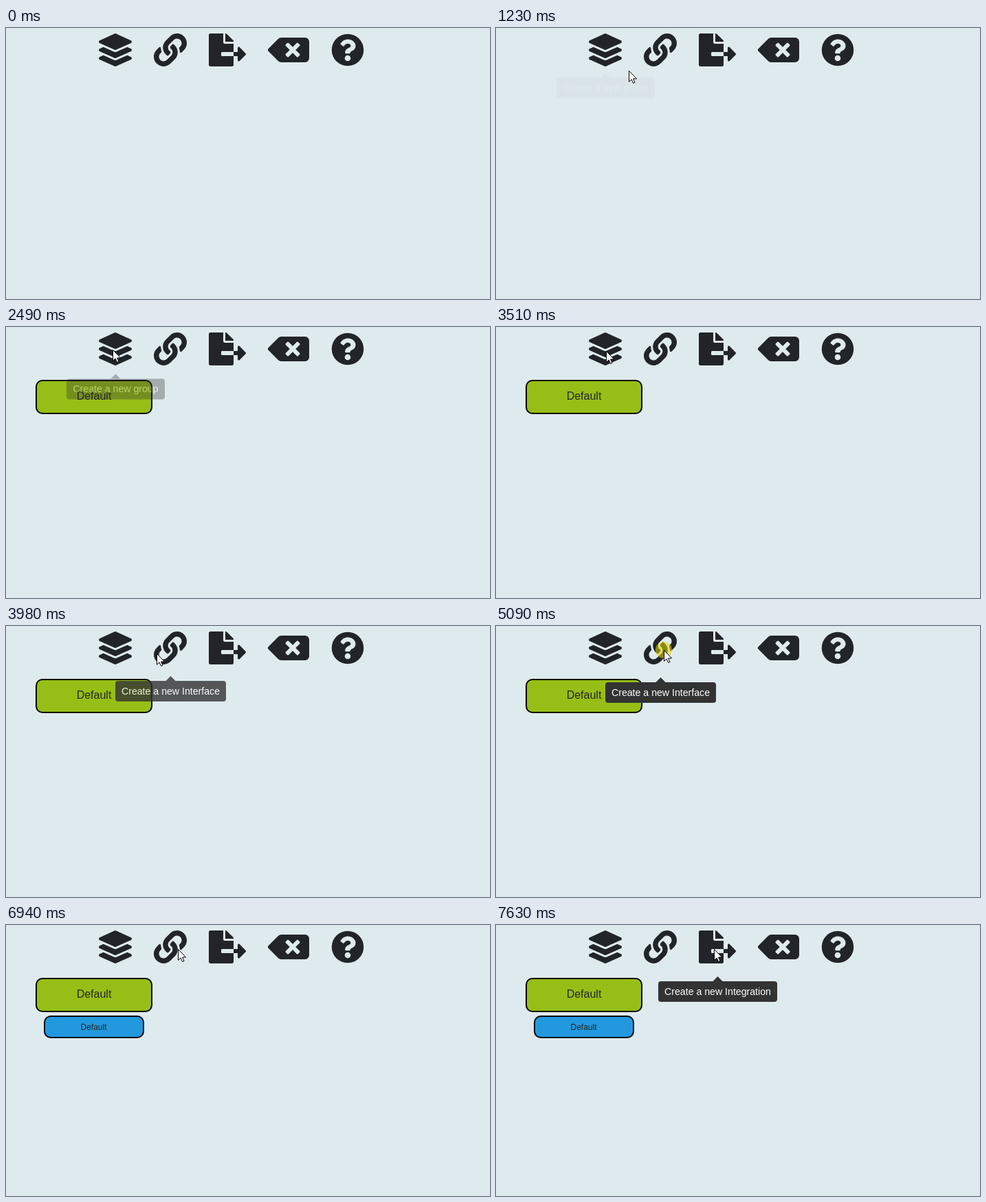
These frames come from a looping animation (704x395 px, 8 s). An HTML page:

```html
<!DOCTYPE html>
<html lang="en">
<head>
<meta charset="utf-8">
<title>Toolbar demo</title>
<style>
  html, body { margin: 0; width: 100%; height: 100%; overflow: hidden; background: #dfeaee; }
  svg { display: block; width: 100vw; height: 100vh; font-family: "Liberation Sans", Arial, sans-serif; }
  text { text-anchor: middle; }
</style>
</head>
<body>
<svg viewBox="0 0 704 395">
  <defs>
    <path id="sheet" d="M499.6 236.3l-58.1-26.3-161.6 73.2a58 58 0 0 1-47.8 0L70.5 210l-58.1 26.3c-16.5 7.5-16.5 32.5 0 40l233 105.6c6.8 3.1 14.4 3.1 21.2 0l233-105.6c16.5-7.5 16.5-32.5 0-40z"/>
    <path id="ring" d="M326.6 185.4c59.7 59.8 58.9 155.7 0 215l-67.2 67.2c-59.3 59.2-155.7 59.2-215 0s-59.2-155.7 0-215l37.2-37.1c9.8-9.9 26.8-3.3 27.3 10.6.6 17.7 3.8 35.5 9.7 52.7 2 5.8.5 12.3-3.8 16.6l-13.1 13.1c-28 28-28.9 73.7-1.2 102 28.1 28.5 74.1 28.7 102.4.5l67.2-67.2c28.2-28.2 28-73.8 0-101.8-3.7-3.7-7.5-6.6-10.4-8.6a16 16 0 0 1-6.9-12.6c-.4-10.6 3.3-21.5 11.7-29.8l21-21.1c5.6-5.5 14.2-6.2 20.6-1.7a152 152 0 0 1 20.5 17.2z"/>
  </defs>

  <g fill="#212529">
    <g transform="translate(135 8) scale(.09375)">
      <path d="M12.4 148l233 105.7c6.8 3.1 14.4 3.1 21.2 0l233-105.7c16.5-7.5 16.5-32.5 0-40L266.6 2.3a25.6 25.6 0 0 0-21.2 0L12.4 108c-16.5 7.5-16.5 32.5 0 40z"/>
      <use href="#sheet"/>
      <use href="#sheet" y="127.8"/>
    </g>
    <g transform="translate(215 8) scale(.09375)">
      <use href="#ring"/>
      <use href="#ring" transform="rotate(180 256 256)"/>
    </g>
    <path transform="translate(295 8) scale(.09375)" d="M384 122c0-6.4-2.5-12.5-7-17L279 7c-4.5-4.5-10.6-7-17-7h-6v128h128zM571 308l-95.7-96.4c-10.1-10.1-27.4-3-27.4 11.3V288h-64v64h64v65.2c0 14.3 17.3 21.4 27.4 11.3L571 332c6.6-6.6 6.6-17.4 0-24zm-379 28v-32c0-8.8 7.2-16 16-16h176V160H248c-13.2 0-24-10.8-24-24V0H24C10.7 0 0 10.7 0 24v464c0 13.3 10.7 24 24 24h336c13.3 0 24-10.7 24-24V352H208c-8.8 0-16-7.2-16-16z"/>
    <path transform="translate(381 8) scale(.09375)" fill-rule="evenodd" d="M576 64H205a64 64 0 0 0-45 19L9.4 233.4a32 32 0 0 0 0 45.2L160 429a64 64 0 0 0 45 19h371a64 64 0 0 0 64-64V128a64 64 0 0 0-64-64zM491.3 318a16 16 0 0 1 0 22.7l-22.6 22.6a16 16 0 0 1-22.6 0L384 301.3l-62 62a16 16 0 0 1-22.7 0l-22.6-22.6a16 16 0 0 1 0-22.7l62-62-62-62a16 16 0 0 1 0-22.7l22.6-22.6a16 16 0 0 1 22.7 0l62 62 62-62a16 16 0 0 1 22.7 0l22.6 22.6a16 16 0 0 1 0 22.7l-62 62z"/>
    <path transform="translate(473 8) scale(.09375)" fill-rule="evenodd" d="M8 256a248 248 0 0 1 496 0a248 248 0 0 1-496 0zM262.7 90c-54.5 0-89.3 23-116.6 63.8a12 12 0 0 0 2.7 16.2l34.7 26.3a12 12 0 0 0 16.7-2.1c17.9-22.7 30.1-35.8 57.3-35.8 20.4 0 45.7 13.1 45.7 33 0 14.9-12.4 22.6-32.5 33.9C247 238.5 216 255 216 296v4a12 12 0 0 0 12 12h56a12 12 0 0 0 12-12v-1.3c0-28.5 83.2-29.7 83.2-106.7 0-58-60.2-102-116.5-102zM210 384a46 46 0 0 1 92 0a46 46 0 0 1-92 0z"/>
  </g>

  <g id="group">
    <rect x="44" y="78" width="168" height="48" rx="9" fill="#97be16" stroke="#000" stroke-width="2"/>
    <text x="128" y="106" font-size="16" fill="#212529">Default</text>
  </g>
  <g id="interface">
    <rect x="56" y="133" width="144" height="31" rx="9" fill="#2299de" stroke="#000" stroke-width="2"/>
    <text x="127.5" y="153" font-size="12" fill="#212529">Default</text>
  </g>
  <g id="tips"></g>
  <circle id="click" r="12" fill="#e8d800" opacity=".55"/>
  <path id="cursor" d="M.5 .5V16.3L4.1 12.9 6.6 18.4 9 17.4 6.6 12H11.6z" fill="#fff" stroke="#000"/>
</svg>

<script>
const LOOP = 8000, FADE = 300;
const $ = id => document.getElementById(id);

// Bursts of pointer movement: evenly spaced steps from start to end.
const moves = [
  [480, 1230, "620,376 554,335 468,295 428,267 368,234 315,203 290,178 260,138 231,110 210,82 193,62"],
  [1310, 1700, "181,51 171,43 164,38 160,35 157,33 156,33"],
  [1850, 1850, "155,33"],
  [2320, 2650, "155,33 155,33 155,33 155,33 155,33"],
  [3420, 4220, "156,34 160,35 165,37 172,39 182,40 193,41 206,41 219,40 226,39 231,38 235,37"],
  [4300, 4460, "239,36 242,35 244,35"],
  [5090, 5470, "244,35 244,35 245,35 247,35 249,35 250,35"],
  [6940, 7630, "250,35 253,35 259,35 267,35 278,35 290,35 302,35 310,35 315,35 317,35"]
].map(([start, end, path]) => ({ start, end, points: path.split(" ").map(p => p.split(",")) }));

const tips = [
  { text: "Create a new group", x: 88, width: 143, show: 1218, hide: 2370 },
  { text: "Create a new Interface", x: 159, width: 161, show: 3830, hide: 5140 },
  { text: "Create a new Integration", x: 236, width: 173, show: 7230, hide: Infinity }
];
for (const tip of tips) {
  const mid = tip.x + tip.width / 2;
  tip.node = document.createElementNS("http://www.w3.org/2000/svg", "g");
  tip.node.innerHTML = `
    <path d="M${mid - 7} 82l7-7 7 7z" fill="#333"/>
    <rect x="${tip.x}" y="82" width="${tip.width}" height="30" rx="4" fill="#333"/>
    <text x="${mid}" y="102" font-size="14.15" fill="#fff">${tip.text}</text>`;
  $("tips").append(tip.node);
}

// cubic-bezier(.25, .1, .25, 1)
function ease(x) {
  if (x <= 0) return 0;
  if (x >= 1) return 1;
  let lo = 0, hi = 1, s;
  for (let i = 0; i < 20; i++) {
    s = (lo + hi) / 2;
    if (.75 * s * (1 - s) + s ** 3 < x) lo = s; else hi = s;
  }
  return .3 * s * (1 - s) ** 2 + 3 * s * s * (1 - s) + s ** 3;
}

function sample(t) {
  const move = moves.findLast(m => m.start <= t);
  if (!move) return { time: 0, point: null };
  const last = move.points.length - 1;
  const step = last ? (move.end - move.start) / last : 1;
  const k = Math.min(last, Math.floor((t - move.start) / step + .06));
  return { time: move.start + k * step, point: move.points[k] };
}

const toggle = (node, on) => node.setAttribute("visibility", on ? "visible" : "hidden");

function render(t) {
  const { time, point } = sample(t);
  toggle($("group"), time >= 2400);
  toggle($("interface"), time >= 5160);
  toggle($("click"), [2320, 5090].some(at => time >= at && time < at + 140));
  toggle($("cursor"), point);
  if (point) {
    for (const id of ["cursor", "click"]) $(id).setAttribute("transform", `translate(${point})`);
  }
  for (const { node, show, hide } of tips) {
    const p = ease((time - show) / FADE) - ease((time - hide) / FADE);
    toggle(node, p > .01);
    node.setAttribute("opacity", p);
    node.setAttribute("transform", `translate(0 ${10 * (p - 1)})`);
  }
}

const begin = performance.now();
function tick() {
  render((performance.now() - begin) % LOOP);
  requestAnimationFrame(tick);
}
tick();
</script>
</body>
</html>
```
